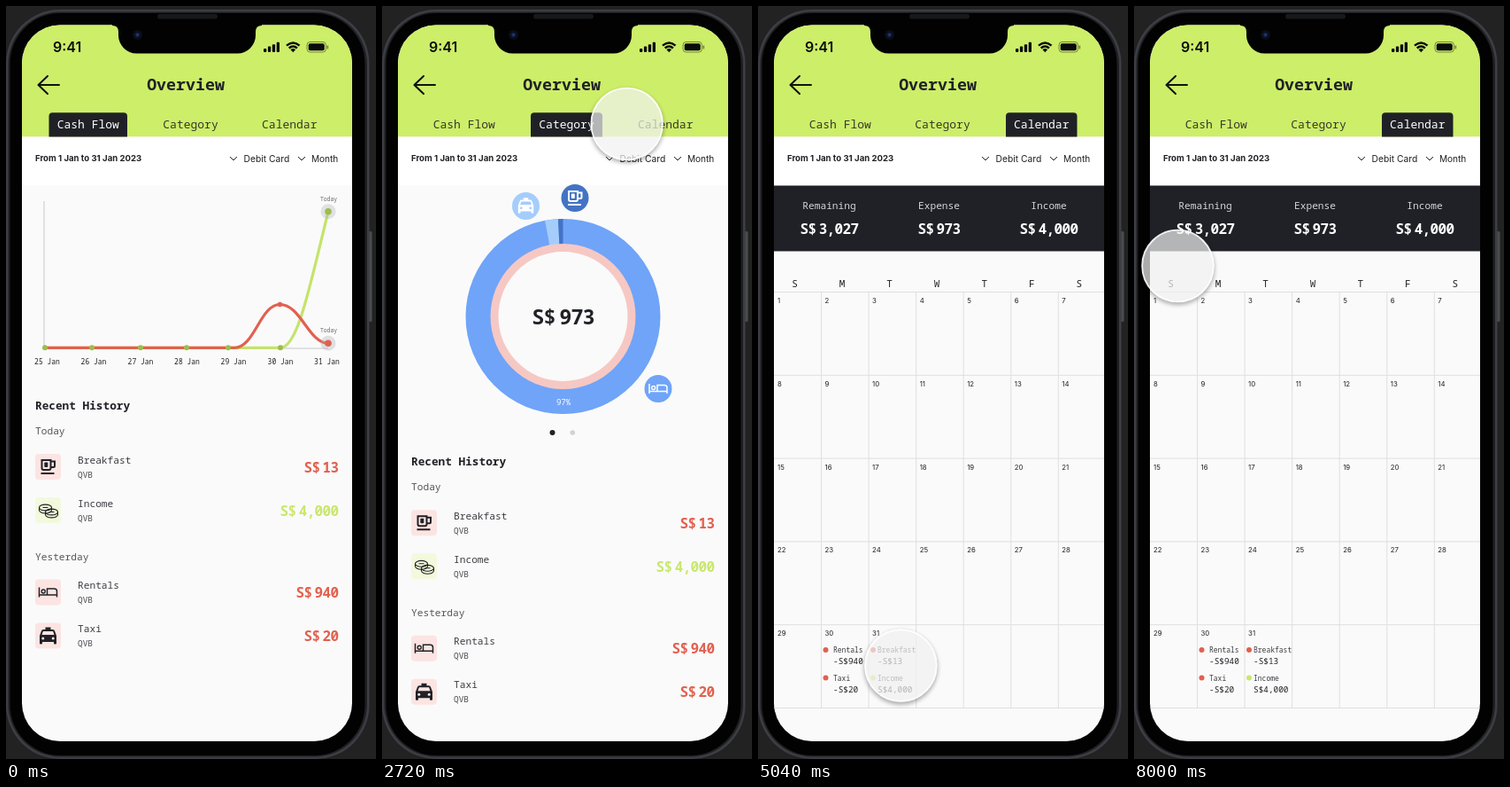
Recreate the animation shown at these times as an HTML page. Size 418 px wide and 849 px high, loop 8.08 s.

```html
<!DOCTYPE html>
<html lang="en">
<head>
<meta charset="utf-8">
<title>Overview</title>
<style>
  html, body { margin: 0; width: 100%; height: 100%; overflow: hidden; background: #222; }
  svg { display: block; width: 100%; height: 100%; }
  text { font-family: "Noto Sans Mono", monospace; fill: #202126; white-space: pre; }
  .sans { font-family: Inter, sans-serif; }
  .money { letter-spacing: -.04em; word-spacing: -.36em; font-weight: 600; }
</style>
</head>
<body>
<svg id="stage" viewBox="0 0 418 849" xmlns="http://www.w3.org/2000/svg"></svg>
<script>
const LOOP = 8080;
const INK = '#202126', RED = '#E2604F', LIME = '#C9E76E', GREEN = '#CDEE69', PAGE = '#FAFAFA';
const BLUE = '#6FA4F8', SKY = '#A4CDFC', NAVY = '#4373C5', BANK = 'QVB';

const text = (x, y, size, str, o = {}) =>
  `<text x="${x}" y="${y}" font-size="${size}" class="${o.cls || ''}" text-anchor="${o.at || 'start'}"
    style="fill:${o.fill || INK}" font-weight="${o.w || 400}">${str}</text>`;
const money = (x, y, size, str, fill, at) =>
  `<text x="${x}" y="${y}" font-size="${size}" class="money" text-anchor="${at}" style="fill:${fill}">${str}</text>`;
const rect = (x, y, w, h, fill, r = 0) =>
  `<rect x="${x}" y="${y}" width="${w}" height="${h}" rx="${r}" fill="${fill}"/>`;
const disc = (x, y, r, fill) => `<circle cx="${x}" cy="${y}" r="${r}" fill="${fill}"/>`;
const line = (d, color, w, extra = '') =>
  `<path d="${d}" fill="none" stroke="${color}" stroke-width="${w}" ${extra}/>`;
const round = 'stroke-linecap="round" stroke-linejoin="round"';

// Icons are centred on 0,0
const icons = {
  cup: c => line('M-7 -7.5H3V1.5Q3 3.5 1 3.5H-5Q-7 3.5 -7 1.5ZM3 -6H7.5V-1Q7.5 .5 6 .5H3M-8 7.5H7', c, 2) +
    rect(-4.2, -5, 4, 5.5, c, 1),
  coins: c => [[-3, -3], [4, 2]].map(([x, y]) =>
    line(`M${x - 7} ${y}a7 3.4 0 0 1 14 0a7 3.4 0 0 1 -14 0v3a7 3.4 0 0 0 14 0v-3M${x - 3} ${y}h6`, c, 1.1)).join(''),
  bed: c => line('M-10 -5.5V5.5M-10 3H10M10 5.5V-1Q10 -4 7 -4H-1V3', c, 1.5) +
    `<circle cx="-5.3" cy="-1" r="2" fill="none" stroke="${c}" stroke-width="1.4"/>`,
  taxi: (c, hole) => `<path fill="${c}" d="M-3 -9.5H3V-7H5.5Q7 -7 7.5 -5.5L9.5 0V8.5Q9.5 9.5 8.5 9.5H7.5Q6.5 9.5 6.5 8.5V7H-6.5V8.5Q-6.5 9.5 -7.5 9.5H-8.5Q-9.5 9.5 -9.5 8.5V0L-7.5 -5.5Q-7 -7 -5.5 -7H-3Z"/>` +
    `<path fill="${hole}" d="M-5.6 -5H5.6L7 -1H-7Z"/>` + disc(-5.7, 3, 1.5, hole) + disc(5.7, 3, 1.5, hole)
};
const icon = (name, x, y, color, hole, s = 1) =>
  `<g transform="translate(${x} ${y}) scale(${s})">${icons[name](color, hole)}</g>`;

const entry = (x, y, kind, name, amount, gain, right) => {
  const tint = gain ? '#F3F9DC' : '#FCE4E2';
  return rect(x, y - 14.5, 29, 29, tint, 4) + icon(kind, x + 14.5, y, INK, tint) +
    text(x + 48, y - 4, 11.2, name, { fill: '#3c3d42' }) +
    text(x + 48, y + 12, 9.4, BANK, { fill: '#4a4b50' }) +
    money(right, y + 6, 16, amount, gain ? LIME : RED, 'end');
};

const history = dy => `<g transform="translate(0 ${dy})">` +
  text(33, 455, 12.75, 'Recent History', { w: 600 }) +
  text(33, 483, 11.2, 'Today', { fill: '#55565b' }) +
  entry(33, 519.5, 'cup', 'Breakfast', 'S$ 13', false, 375.5) +
  entry(33, 568.5, 'coins', 'Income', 'S$ 4,000', true, 375.5) +
  text(33, 625, 11.2, 'Yesterday', { fill: '#55565b' }) +
  entry(33, 661, 'bed', 'Rentals', 'S$ 940', false, 375.5) +
  entry(33, 710, 'taxi', 'Taxi', 'S$ 20', false, 375.5) + '</g>';

function cashFlow() {
  const xs = [44, 97, 152, 204, 251, 310], mid = [46.5, 99, 152, 204.5, 257, 310, 362.5];
  return line('M43 220V386H364', '#E1E1E3', 2) +
    line('M44 385.3H310C330 385.3 344 312 364 232', '#C5E36B', 3.2) +
    line('M44 385.3H258C281 385.3 287 336.5 309.5 336.5C333 336.5 342 380.3 364 380.3', RED, 3.2) +
    xs.map(x => disc(x, 385.3, 3, '#9DBD4C')).join('') + disc(309.5, 336.5, 2.8, RED) +
    disc(364, 231.8, 8.5, '#a9aeb455') + disc(364, 231.8, 3.8, '#9DBD4C') +
    disc(364, 380.3, 8.5, '#a9aeb455') + disc(364, 380.3, 3.8, RED) +
    [220, 368].map(y => text(364.5, y, 6.4, 'Today', { at: 'middle', fill: '#66676b' })).join('') +
    mid.map((x, i) => text(x, 403.5, 8, `${25 + i} Jan`, { at: 'middle', w: 500 })).join('') + history(0);
}

function category() {
  const cx = 204.5, cy = 350;
  const slice = (a, b, color) => {
    const p = (r, d) => `${cx + r * Math.sin(d * Math.PI / 180)} ${cy - r * Math.cos(d * Math.PI / 180)}`;
    return `<path fill="${color}" d="M${p(110, a)}A110 110 0 0 1 ${p(110, b)}L${p(80, b)}A80 80 0 0 0 ${p(80, a)}Z"/>`;
  };
  return disc(cx, cy, 110, BLUE) + slice(-10.7, -2.9, SKY) + slice(-2.9, 0, NAVY) +
    disc(cx, cy, 82, '#F6C8C4') + disc(cx, cy, 73, PAGE) +
    money(cx, 358.5, 23.5, 'S$ 973', INK, 'middle') +
    text(205, 449.5, 9, '97%', { at: 'middle', fill: '#fff', w: 500 }) +
    disc(162.5, 225.5, 15.5, SKY) + icon('taxi', 162.5, 225, '#fff', SKY, .92) +
    disc(218, 216.5, 15.5, NAVY) + icon('cup', 218, 216.5, '#fff', NAVY) +
    disc(312, 431.5, 15.5, BLUE) + icon('bed', 312, 431.5, '#fff', BLUE) +
    disc(192.5, 481, 3, INK) + disc(215.3, 481, 2.8, '#D2D2D4') + history(63.3);
}

function calendar() {
  const cw = 53.55, ch = 93.8, left = 18, top = 322.5;
  let out = rect(18, 202.5, 373, 74, INK);
  [['Remaining', 'S$ 3,027', 80.5], ['Expense', 'S$ 973', 204.5], ['Income', 'S$ 4,000', 328.5]].forEach(([a, b, x]) => {
    out += text(x, 228.5, 11.2, a, { at: 'middle', fill: '#D6D6D9', w: 300 }) + money(x, 256.5, 16, b, '#fff', 'middle');
  });
  for (let i = 0; i < 7; i++) {
    out += text(41.5 + i * cw, 317, 11, 'SMTWTFS'[i], { at: 'middle' });
    if (i) out += line(`M${left + i * cw} ${top}V${top + 5 * ch}`, '#DFDFE1', 1);
  }
  for (let r = 0; r < 6; r++) out += line(`M18 ${top + r * ch}H391`, '#DFDFE1', 1);
  for (let d = 0; d < 31; d++)
    out += text(left + 4 + d % 7 * cw, 335 + Math.floor(d / 7) * ch, 7.8, d + 1, { cls: 'sans' });
  const note = (dot, x, y, name, sum, color) => disc(dot, y - 3, 3, color) +
    text(x, y, 8, name, { fill: '#3c3d42' }) + text(x, y + 13, 9.4, sum);
  return out + note(76.5, 85, 729, 'Rentals', '-S$940', RED) + note(76.5, 85, 760.5, 'Taxi', '-S$20', RED) +
    note(130, 135, 729, 'Breakfast', '-S$13', RED) + note(130, 135, 760.5, 'Income', 'S$4,000', LIME);
}

const tabs = [['Cash Flow', 48.5, 88.5], ['Category', 168, 81], ['Calendar', 280, 80.5]];
const tabBar = on => tabs.map(([name, x, w], i) =>
  (i === on ? `<path fill="${INK}" d="M${x} 147.5V124.3q0 -4 4 -4h${w - 8}q4 0 4 4v23.2z"/>` : '') +
  text(x + w / 2, 137.5, 13, name, { at: 'middle', fill: i === on ? '#fff' : '#35382a' })).join('');

const header = rect(18, 21, 374, 126.5, GREEN) +
  text(53, 52, 16, '9:41', { cls: 'sans', w: 600, fill: '#0b0b0b' }) +
  [0, 1, 2, 3].map(i => rect(291 + i * 4.9, 48 - i * 2.4, 3.3, 4 + i * 2.4, '#0b0b0b', 1)).join('') +
  line('M317 44.7Q324.3 38.2 331.6 44.7M319.7 47.5Q324.3 43.4 328.9 47.5', '#0b0b0b', 2.4) +
  '<path d="M321.5 49.2Q324.3 46.8 327.1 49.2L324.3 52.2Z" fill="#0b0b0b"/>' +
  '<rect x="340" y="40.5" width="21.5" height="11.5" rx="3.5" fill="none" stroke="#0b0b0b" stroke-opacity=".45"/>' +
  rect(341.7, 42.2, 18.1, 8.1, '#0b0b0b', 2) + rect(362.7, 44.5, 1.4, 4, '#0b0b0b88', .7) +
  line('M60 89H37M47 79L36.5 89L47 99', '#111', 2, round) +
  text(203, 94.5, 18.3, 'Overview', { at: 'middle', w: 600 });

const filters = rect(18, 147.5, 373, 55, '#fff') +
  text(33, 175.3, 9.6, 'From 1 Jan to 31 Jan 2023', { cls: 'sans', w: 700 }) +
  text(320.3, 175.5, 10.3, 'Debit Card', { cls: 'sans', at: 'end' }) +
  text(375.3, 175.5, 10.1, 'Month', { cls: 'sans', at: 'end' }) +
  [257, 334].map(x => line(`M${x - 4} 170l4 4l4 -4`, INK, 1)).join('');

const sheet = `<path fill="${PAGE}" d="M18 850V275q0 -14 14 -14H377q14 0 14 14V850z"/>` +
  line('M18 321.5H391', '#E0E0E2', 1) + line('M39.5 286l11 11m0 -11l-11 11', '#333', 1.3) +
  line('M133.5 285l-7 7l7 7M275.5 285l7 7l-7 7', INK, 2, round) +
  text(204.5, 297, 14.9, '31 Jan 2023', { cls: 'sans', at: 'middle', w: 600 }) +
  text(49, 363, 12.5, 'Expense:', { w: 600 }) + money(120, 363, 13.3, 'S$ 13', INK, 'start') +
  entry(48.5, 401, 'cup', 'Breakfast', 'S$ 13', false, 360) +
  text(49, 460, 12.5, 'Income', { w: 600 }) + money(104.5, 460, 13.3, 'S$ 4,000', INK, 'start') +
  entry(48.5, 497.5, 'coins', 'Income', 'S$ 4,000', true, 360);

const phone = rect(0, 0, 418, 849, '#222223') + rect(409, 254, 4.5, 102, '#4a4b4f', 1.5) +
  rect(0, 4, 410.5, 845, '#3C3E43', 61) + rect(2.5, 6.5, 405.5, 840, '#202125', 59) +
  rect(4.5, 8, 401, 837, '#020202', 57);
const notch = '<path fill="#020202" d="M120 20H289V22Q282 22 282 29V33A20.5 20.5 0 0 1 261.5 53.5H147.5A20.5 20.5 0 0 1 127 33V29Q127 22 120 22Z"/>' +
  rect(171, 9, 68, 5.5, '#17181a', 2.5) + disc(148.5, 32.5, 5.5, '#0b0d18') + disc(148.5, 32.5, 2.3, '#1e2f6b');

const $ = id => document.getElementById(id);
$('stage').innerHTML = `<defs>
    <clipPath id="screen"><rect x="18" y="21.5" width="373" height="807.5" rx="43"/></clipPath>
    <filter id="soft" x="-5%" y="-5%" width="110%" height="110%"><feGaussianBlur id="blur" stdDeviation="1.4"/></filter>
    <filter id="drop" x="-30%" y="-30%" width="160%" height="160%"><feGaussianBlur stdDeviation="2.5"/></filter>
    <mask id="ring"><rect x="-60" y="-60" width="120" height="120" fill="#fff"/><circle r="41" fill="#000"/></mask>
  </defs>${phone}
  <g clip-path="url(#screen)">
    <g id="app">${rect(18, 21, 374, 809, PAGE)}${header}${filters}
      ${[cashFlow, category, calendar].map((page, i) => `<g id="page${i}">${tabBar(i)}${page()}</g>`).join('')}
    </g>
    <rect id="veil" x="18" y="21" width="374" height="809" fill="#fff"/>
    <g id="sheet">${sheet}</g>
  </g>${notch}
  <g id="cursor">
    <g id="shadow" mask="url(#ring)"><circle cy="2.5" r="41.5" fill="#000" filter="url(#drop)"/></g>
    <circle id="glass" r="40.3" fill="#F1F1F1" stroke="#fff" stroke-width="1.8" stroke-opacity=".9"/>
  </g>`;

const span = (t, a, b) => Math.min(1, Math.max(0, (t - a) / (b - a)));
const smooth = u => u * u * (3 - 2 * u);
const easeOut = u => 1 - (1 - u) ** 3;
const spring = ms => {
  if (ms <= 0) return 0;
  const s = ms / 1000, w = 4.5, k = 4.3;
  return 1 - Math.exp(-k * s) * (Math.cos(w * s) + k / w * Math.sin(w * s));
};

// Each move shifts the cursor by dx, dy
const moves = [
  [-27, 7, t => smooth(span(t, 900, 1500))],
  [112, 0, t => spring(t - 2450)],
  [-159, 612, t => spring(t - 3700)],
  [-111.5, -452, t => smooth(span(t, 6200, 6760))]
];

function draw(t) {
  const page = t < 1680 ? 0 : t < 3600 ? 1 : 2;
  for (let i = 0; i < 3; i++) $('page' + i).style.display = i === page ? '' : 'none';

  const open = easeOut(span(t, 5400, 5760)) - easeOut(span(t, 7300, 7660));
  $('sheet').setAttribute('transform', `translate(0 ${(1 - open) * 570})`);
  $('veil').setAttribute('opacity', open * .53);
  $('blur').setAttribute('stdDeviation', 1.4 * open);
  if (open > .01) $('app').setAttribute('filter', 'url(#soft)');
  else $('app').removeAttribute('filter');

  let x = 235, y = 126;
  for (const [dx, dy, at] of moves) { x += dx * at(t); y += dy * at(t); }
  $('cursor').setAttribute('transform', `translate(${x} ${y})`);
  $('cursor').setAttribute('opacity', span(t, 900, 1040));
  const solid = span(t, 1040, 1350);
  $('shadow').setAttribute('opacity', solid * .32);
  $('glass').setAttribute('fill-opacity', .42 + solid * .29);
}

const start = performance.now();
function tick() {
  draw((performance.now() - start) % LOOP);
  requestAnimationFrame(tick);
}
tick();
</script>
</body>
</html>
```
